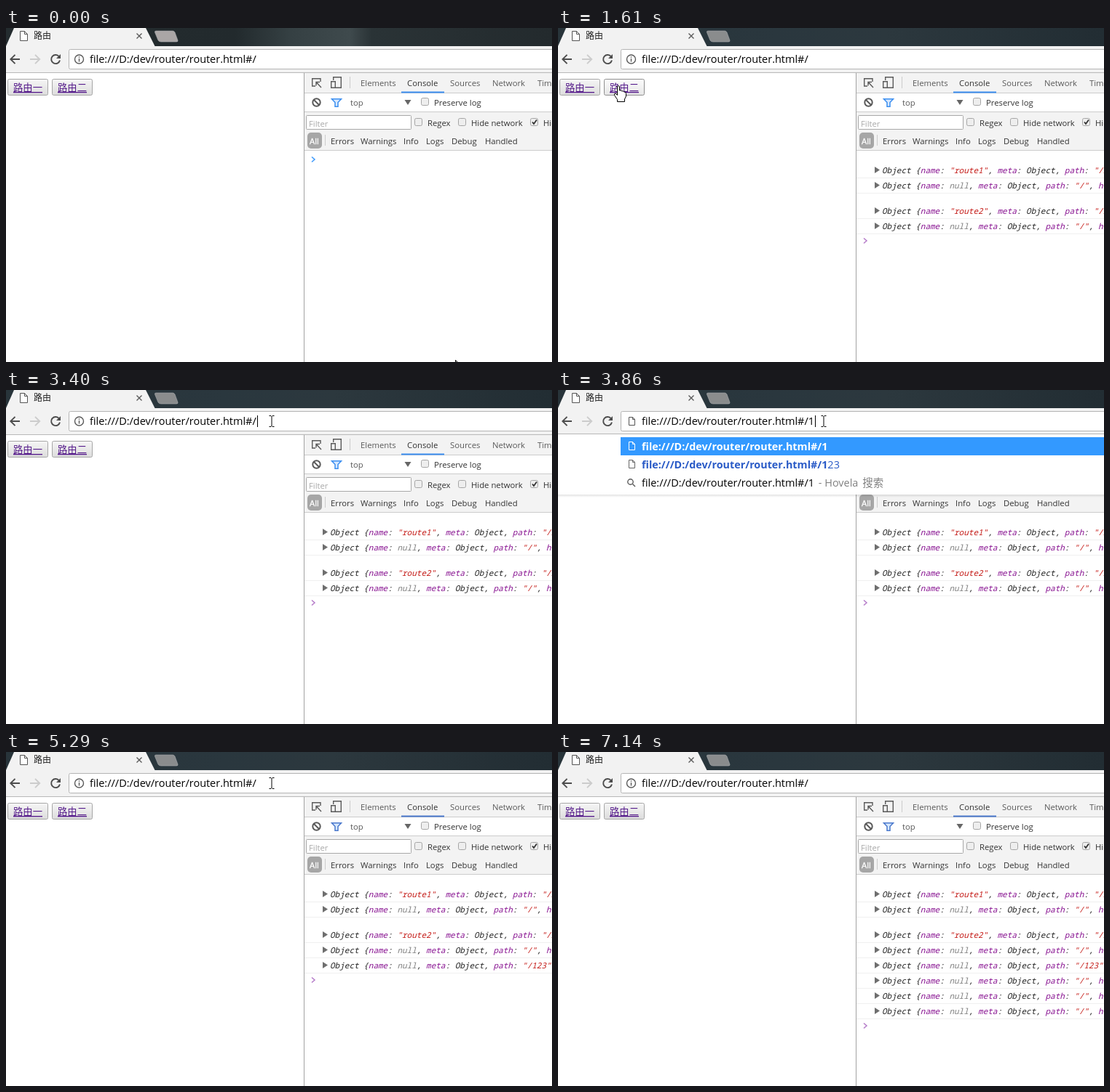
Animation, 750 px wide and 460 px high, one loop 7.23 s. Source, as an HTML page:

```html
<!DOCTYPE html>
<html lang="zh">
<head>
<meta charset="utf-8">
<title>路由</title>
<style>
html, body { margin: 0; width: 100%; height: 100%; overflow: hidden; background: #fff; }
svg { display: block; width: 100%; height: 100%; }
text { font-family: "Open Sans", "Noto Sans CJK SC", "Noto Sans CJK", sans-serif; white-space: pre; }
.url text { font-size: 14.47px; }
.url .bold { font-size: 14.33px; font-weight: 700; }
.tools text { font-size: 11.3px; fill: #333; }
.tools .tab { fill: #5a5a5a; }
.log text { font: italic 11px "Noto Sans Mono", "DejaVu Sans Mono", monospace; fill: #222; }
.key { fill: #881391; }
.str { fill: #c41a16; }
.nil { fill: #808080; }
.link { font-size: 13.33px; fill: #551a8b; text-decoration: underline; }
.line { fill: none; stroke: #5a5a5a; stroke-width: 1.4; }
.box { fill: #eee; stroke: #a5a5a5; }
.cursor path { fill: #fff; stroke: #000; }
</style>
</head>
<body>
<svg viewBox="0 0 750 460">
  <defs>
    <linearGradient id="strip">
      <stop offset="0" stop-color="#242c2f"/><stop offset=".42" stop-color="#222a2d"/>
      <stop offset=".52" stop-color="#354043"/><stop offset=".63" stop-color="#3f4a4d"/>
      <stop offset=".67" stop-color="#2a3336"/><stop offset="1" stop-color="#232a2d"/>
    </linearGradient>
    <linearGradient id="stripLater">
      <stop offset="0" stop-color="#28343a"/><stop offset=".4" stop-color="#2a373e"/>
      <stop offset=".6" stop-color="#2c383e"/><stop offset="1" stop-color="#222d33"/>
    </linearGradient>
    <linearGradient id="face" x2="0" y2="1">
      <stop offset="0" stop-color="#f6f6f6"/><stop offset="1" stop-color="#dcdcdc"/>
    </linearGradient>
    <linearGradient id="hover" x2="0" y2="1">
      <stop offset="0" stop-color="#fcfcfc"/><stop offset="1" stop-color="#e6e6e6"/>
    </linearGradient>
    <linearGradient id="shade" x2="0" y2="1">
      <stop offset="0" stop-color="#000" stop-opacity=".11"/><stop offset="1" stop-color="#000" stop-opacity="0"/>
    </linearGradient>
    <path id="doc" d="M.5.5H5.5L8.5 3.5V11.5H.5ZM5.5.5V3.5H8.5" fill="none"/>
  </defs>

  <rect width="750" height="460" fill="#fff"/>

  <g id="buttons"></g>

  <g class="tools">
    <path d="M410 62H750V89H410ZM410 116H750V168H410Z" fill="#f3f3f3"/>
    <path d="M409.5 62V460" stroke="#a3a3a3"/>
    <path d="M410 89.5H750M410 115.5H750M410 168.5H750M472.5 67V83M438.5 147V162" stroke="#ccc"/>
    <g class="line">
      <path d="M425 80H420.700V69.700H432V74M426 74.500L433 82M426 79.500V74.500H431"/>
      <path d="M449.700 72V67.700H460.300V82.300H452M446.700 73.700H452.300V82.300H446.700Z"/>
      <circle cx="426.500" cy="102.500" r="5.200" stroke-width="2"/>
      <path d="M423 99L430 106" stroke-width="2"/>
    </g>
    <path class="accent" d="M543 87.500H602V89.500H543Z"/>
    <path class="accent-line" d="M447.500 97.700H460.500L456 102.500V108.300H452V102.500Z" fill="#d6e8ff" stroke-width="1.500"/>
    <path d="M547.500 99H556.500L552 106Z" fill="#666"/>
    <rect class="box" x="570.500" y="96.500" width="10" height="10" rx="2"/>
    <rect x="412.500" y="120.500" width="144" height="19" rx="1" fill="#fff" stroke="#a8a8a8"/>
    <rect class="box" x="561.500" y="124.500" width="10" height="10" rx="2"/>
    <rect class="box" x="621.500" y="124.500" width="10" height="10" rx="2"/>
    <rect class="box" x="720.500" y="124.500" width="10" height="10" rx="2"/>
    <path d="M723 129.500L725 132L729 126.500" fill="none" stroke="#333" stroke-width="1.800"/>
    <rect x="414" y="144" width="20" height="22" rx="5" fill="#a6a6a6"/>
    <g id="labels"></g>
  </g>

  <g class="log" id="log"></g>
  <path id="prompt" d="M-2-3.500L2 0L-2 3.500" fill="none" stroke-width="1.500"/>

  <rect id="frame" width="750" height="25"/>
  <path d="M0 25L11 0H192L204.500 25Z" fill="#f2f2f2"/>
  <path id="newTab" d="M206 4H229Q231 4 232 6L236 17Q236.500 19 234 19H213Q210 19 209 17L204.500 6Q204 4 206 4Z" stroke="#a9aeb0" stroke-width=".6"/>
  <rect y="25" width="750" height="36" fill="#f2f2f2"/>
  <path d="M0 61.500H750" stroke="#b8b8b8"/>
  <path d="M19.500 4.500H25.500L29.500 8.500V17.500H19.500ZM25.500 4.500V8.500H29.500" fill="#fff" stroke="#555"/>
  <text x="38" y="15" font-size="12" fill="#222">路由</text>
  <path d="M179.500 7.500L186.500 14.500M186.500 7.500L179.500 14.500" class="line" stroke-width="1.600"/>
  <g fill="none" stroke="#4d4d4d" stroke-width="1.900">
    <path d="M19 43H6.500M12.500 36.800L6.300 43L12.500 49.200"/>
    <path d="M33 43H46M40 36.800L46.200 43L40 49.200" stroke="#ccc"/>
    <path d="M73 39.500A6 6 0 1 0 74 44.500"/>
    <path d="M75 36V42H69Z" fill="#4d4d4d" stroke="none"/>
  </g>
  <rect x="86.500" y="29.500" width="670" height="27" rx="2" fill="#fff" stroke="#b4b4b4"/>
  <g id="info">
    <circle cx="100.500" cy="43" r="6" class="line"/>
    <path d="M100.500 42V46.500M100.500 39.200V40.700" class="line"/>
  </g>
  <use id="page" href="#doc" x="97" y="37" stroke="#555"/>
  <g class="url">
    <rect id="mark" y="33" height="19" fill="#3399ff"/>
    <text x="115" y="48"><tspan id="base">file:///D:/dev/router/router.html</tspan><tspan id="tail"></tspan></text>
  </g>
  <path id="caret" d="M.5 35V51" stroke="#000"/>

  <g id="menu">
    <rect id="menuShade" width="750" height="4" fill="url(#shade)"/>
    <rect id="menuBox" y="61" width="750" fill="#fff"/>
    <path d="M0 60.500H750" stroke="#b8b8b8"/>
    <rect x="86" y="65" width="664" height="25" fill="#3399ff"/>
    <use href="#doc" x="97" y="71" stroke="#fff"/>
    <g class="url">
      <text class="bold" id="first" x="115" y="83" fill="#fff"></text>
      <g id="second">
        <use href="#doc" x="97" y="96" stroke="#666"/>
        <text x="115" y="108" fill="#2a5bc7"><tspan class="bold" id="match"></tspan><tspan id="rest"></tspan></text>
      </g>
      <g id="search">
        <circle cx="99.500" cy="101.500" r="3.700" class="line"/>
        <path d="M102.500 104.500L106 108" class="line" stroke-width="2"/>
        <text x="115" y="108"><tspan id="query"></tspan><tspan dx="2" fill="#808080"> - Hovela </tspan><tspan dx="2" fill="#808080">搜索</tspan></text>
      </g>
    </g>
  </g>

  <g class="cursor" id="cursor">
    <path id="arrow" d="M.5.500V16L4 12.500L6.800 18.500L9.300 17.500L6.500 11.500H11.500Z"/>
    <path id="hand" d="M-1.500 1.500Q0-.500 1.500 1.500V7Q3.500 6 4.500 8Q6.500 7 7.500 9Q10.500 8.500 10.500 11.500V15L8.500 19V22.500H-1.500V19.500L-5.500 13.500Q-6 11-4 11L-1.500 13.500Z"/>
    <path id="beam" d="M-3.500-7.500H-1L0-6.500L1-7.500H3.500M0-6.500V6.500M-3.500 7.500H-1L0 6.500L1 7.500H3.500" style="fill:none"/>
  </g>
</svg>
<script>
const LOOP = 7230;
const BASE = 'file:///D:/dev/router/router.html';
const $ = id => document.getElementById(id);
const show = (id, on) => { $(id).style.display = on ? '' : 'none'; };
const set = (id, attrs) => { for (const k in attrs) $(id).setAttribute(k, attrs[k]); };

const labels = [
  [487, 80, 'Elements', 'tab'], [551, 80, 'Console'], [610, 80, 'Sources', 'tab'],
  [668, 80, 'Network', 'tab'], [730, 80, 'Timeline', 'tab'],
  [473, 107, 'top', 'tab'], [588, 107, 'Preserve log'],
  [579, 135, 'Regex'], [639, 135, 'Hide network'], [738, 135, 'Hide all'],
  [446, 160, 'Errors'], [487, 160, 'Warnings'], [546, 160, 'Info'],
  [577, 160, 'Logs'], [612, 160, 'Debug'], [658, 160, 'Handled']
];
$('labels').innerHTML = labels.map(([x, y, s, c = '']) =>
  `<text x="${x}" y="${y}" class="${c}">${s}</text>`).join('') +
  '<text x="416" y="136" style="fill:#a9a9a9">Filter</text>' +
  '<text x="417" y="160" style="fill:#fff;stroke:#fff;stroke-width:.3">All</text>';

const buttons = [{ x: 2, label: '路由一' }, { x: 63, label: '路由二' }];
$('buttons').innerHTML = buttons.map(({ x, label }, i) =>
  `<rect id="btn${i}" x="${x + .5}" y="70.5" width="55" height="22" rx="2"/>
   <text class="link" x="${x + 8}" y="87">${label}</text>`).join('');

// appear time, baseline, route name, path
const rows = [
  [740, 200, 'route1', '/route1'], [740, 221, null, '/'],
  [1530, 256, 'route2', '/route2'], [1610, 277, null, '/'],
  [5290, 298, null, '/123'], [5360, 319, null, '/'],
  [5360, 340, null, '/'], [5360, 361, null, '/']
];
const key = s => `<tspan class="key">${s}</tspan>: `;
const str = s => `<tspan class="str">"${s}"</tspan>`;
$('log').innerHTML = rows.map(([, y, name, path], i) =>
  `<g id="row${i}"><path d="M410 ${y + 6.5}H750" stroke="#f0f0f0"/>
   <path d="M435 ${y - 9}L442 ${y - 4.5}L435 ${y}Z" fill="#6e6e6e"/>
   <text x="445" y="${y}">Object {${key('name')}${name ? str(name) : '<tspan class="nil">null</tspan>'}, ` +
  `${key('meta')}Object, ${key('path')}${str(path)}, ${key('hash')}${str('')}</text></g>`).join('');

// start, end, number of hops, destination
const moves = [
  [70, 510, 7, 28, 80], [820, 1060, 4, 83, 79], [1930, 2450, 7, 365, 43],
  [5890, 5890, 1, 367, 43], [6120, 6200, 2, 369, 58], [6440, 6910, 7, 750, 470]
];
function pointer(t) {
  let x = 617, y = 457;
  for (const [start, end, hops, tx, ty] of moves) {
    if (t < start) break;
    const gap = (end - start) / (hops - 1) || 1;
    const k = Math.min(1, (Math.floor((t - start) / gap + 1e-6) + 1) / hops);
    const e = k * k * (3 - 2 * k);
    x += (tx - x) * e;
    y += (ty - y) * e;
  }
  return [Math.round(x), Math.round(y)];
}

function drawButtons(t, x, y) {
  let over = false;
  buttons.forEach((b, i) => {
    const inside = x >= b.x && x < b.x + 56 && y >= 70 && y < 93;
    const down = i ? t >= 1380 && t < 1530 : t >= 660 && t < 740;
    over = over || inside;
    set('btn' + i, {
      fill: down ? '#dedede' : inside ? 'url(#hover)' : 'url(#face)',
      stroke: down || inside ? '#8f8f8f' : '#a6a6a6'
    });
  });
  return over;
}

function drawCursor(t) {
  const [x, y] = pointer(t);
  const over = drawButtons(t, x, y);
  const typing = !over && x >= 86 && y >= 29 && y < 58;
  set('cursor', { transform: `translate(${x} ${y})` });
  show('hand', over);
  show('beam', typing);
  show('arrow', !over && !typing);
}

function drawMenu(typed) {
  const url = BASE + '#/' + typed;
  const full = typed === '123';
  const bottom = full ? 119 : 144;
  show('menu', typed);
  show('second', !full);
  set('menuBox', { height: bottom - 61 });
  set('menuShade', { y: bottom });
  set('search', { transform: `translate(0 ${full ? 0 : 25})` });
  for (const id of ['first', 'match', 'query']) $(id).textContent = url;
  $('rest').textContent = '123'.slice(typed.length);
}

function drawAddress(t) {
  const open = t >= 3860 && t < 5290;
  const typed = !open ? '' : t < 4100 ? '1' : t < 4330 ? '12' : '123';
  const all = t >= 2620 && t < 2870;
  const part = t >= 2620 && t < 3400;
  $('tail').textContent = '#/' + typed;
  set('base', { fill: all ? '#fff' : '#000' });
  set('tail', { fill: part ? '#fff' : '#000' });
  set('mark', { x: all ? 115 : 329, width: all ? 229 : 15 });
  show('mark', part);
  show('info', !open);
  show('page', open);
  set('caret', { transform: `translate(${345 + Math.round(typed.length * 8.2)} 0)` });
  show('caret', t >= 3400 && t < 4890);
  drawMenu(typed);
}

function drawConsole(t) {
  rows.forEach(([at], i) => show('row' + i, t >= at));
  const last = rows.filter(([at]) => t >= at).pop();
  set('prompt', {
    transform: `translate(422 ${last ? last[1] + 16 : 181})`,
    stroke: last ? '#b57bc9' : '#3b99fc'
  });
  const accent = t < 5290 ? '#3b8ef0' : '#4a78cc';
  document.querySelector('.accent').setAttribute('fill', accent);
  document.querySelector('.accent-line').setAttribute('stroke', accent);
}

function draw() {
  const t = performance.now() % LOOP;
  drawConsole(t);
  drawAddress(t);
  drawCursor(t);
  set('frame', { fill: t < 660 ? 'url(#strip)' : 'url(#stripLater)' });
  set('newTab', { fill: t < 660 ? '#aaa6a6' : '#8a8c8d' });
  requestAnimationFrame(draw);
}
draw();
</script>
</body>
</html>
```
